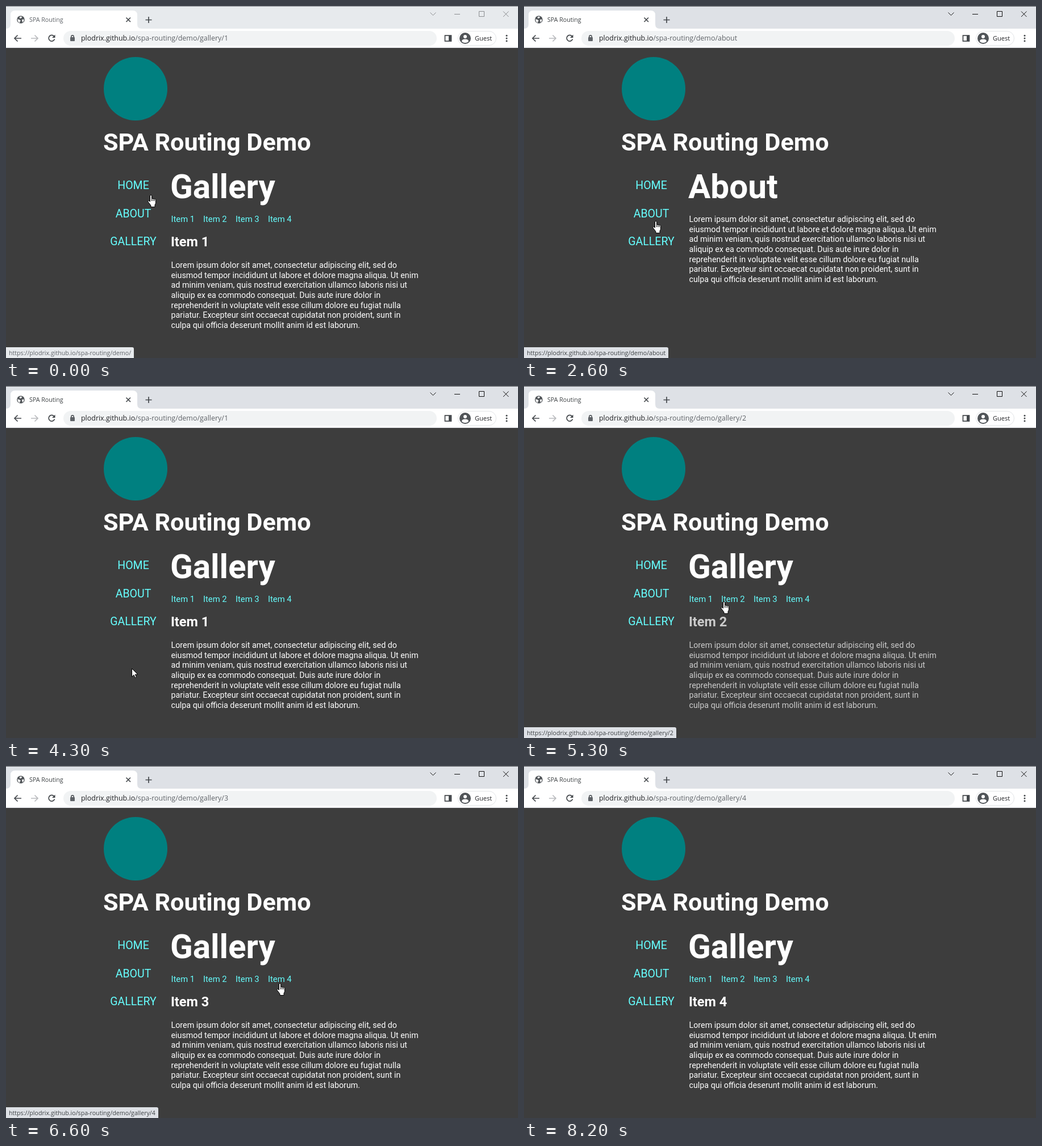
An HTML page for the animation above (8600 ms loop, 901 by 621 pixels).

```html
<!DOCTYPE html>
<html lang="en">
<head>
<meta charset="utf-8">
<title>SPA Routing</title>
<style>
  html, body { margin: 0; width: 100%; height: 100%; overflow: hidden; background: #3d3d3d; }
  svg { display: block; }
  #stage {
    --bar: #dee1e6; --edge: #55585c; --button: #111; --label: #3c4043;
    font-family: "Open Sans", sans-serif;
  }
  #stage.idle { --bar: #e7eaed; --edge: #85888c; --button: #8b8d90; --label: #5f6368; }
  .line { fill: none; stroke-width: 1.7; stroke: #45494d; }
  .button { fill: none; stroke: var(--button); }
  .small { font-size: 10.65px; fill: var(--label); }
  .url { font-size: 12.45px; fill: #5f6368; }
  .site { font-family: Roboto, sans-serif; fill: #fff; }
  .bold { font-weight: 700; }
  .brand { font-size: 43.2px; }
  .head { font-size: 58.4px; }
  .sub { font-size: 23.5px; }
  .nav { font-size: 19.5px; text-anchor: middle; fill: #6ff; }
  .links { font-size: 14.8px; fill: #6ff; }
  .lorem { font-size: 14.3px; }
  .pointer { fill: #fff; stroke: #000; stroke-linejoin: round; }
</style>
</head>
<body>
<svg id="stage" width="901" height="621" viewBox="0 0 901 621">
  <defs>
    <text id="lorem" class="lorem" y="444.4"></text>
  </defs>

  <rect width="901" height="621" fill="#3d3d3d"/>

  <!-- window frame -->
  <rect width="901" height="40" fill="var(--bar)"/>
  <rect width="901" height="1" fill="var(--edge)"/>
  <path d="M0 40q8 0 8-8V16q0-8 8-8h207q8 0 8 8v16q0 8 8 8z" fill="#fff"/>
  <rect y="40" width="901" height="33" fill="#fff"/>
  <rect y="73" width="901" height="1" fill="#dadce0"/>
  <circle cx="26" cy="24" r="6.8" fill="#505458"/>
  <path d="M20.5 23l4 1.5 1.5 2-2 1 .5 2.5q-4-1.5-4-7zM25 18.5l3 .5-.5 2-2.5 1-1.5-1.5zM28 24l3.5-.5q0 4-2.5 5.5l-.5-2.5z" fill="#fff"/>
  <text class="small" x="41" y="28">SPA Routing</text>
  <path class="line" d="M211.5 20.5l7.5 7.5m0-7.500l-7.5 7.5M245.500 24.500h11m-5.500-5.500v11"/>
  <path class="button" d="M746.5 11.5l5 5 5-5M789 14.5h10M832.5 9.5h9v9h-9zM875 9.5l9.500 9.500m0-9.500l-9.500 9.500"/>

  <!-- toolbar -->
  <path class="line" d="M27 57H15m5.500-5.500L15 57l5.500 5.500"/>
  <path class="line" d="M44 57h12m-5.500-5.500L56 57l-5.500 5.500" style="stroke:#b9bbbe"/>
  <path class="line" d="M84.5 53.3a5.300 5.300 0 1 0 1 5"/>
  <path d="M86.5 50.5v5.500H81z" fill="#45494d"/>
  <rect x="101" y="44" width="657" height="26" rx="13" fill="#f1f3f4"/>
  <rect x="113" y="55" width="8" height="7" rx="1" fill="#5f6368"/>
  <path class="line" d="M114.8 55.5v-1.500a2.200 2.200 0 0 1 4.400 0v1.500" style="stroke-width:1.4"/>
  <text class="url" x="132" y="61"><tspan fill="#202124">plodrix.github.io</tspan><tspan id="path"></tspan></text>
  <rect class="line" x="772.5" y="52" width="11" height="10"/>
  <rect x="779" y="52" width="5" height="10" fill="#45494d"/>
  <rect x="795.5" y="44.5" width="67" height="25" rx="12.5" fill="#fff" stroke="#e2e4e7"/>
  <circle cx="808" cy="57" r="10" fill="#505458"/>
  <circle cx="808" cy="54" r="3" fill="#fff"/>
  <path d="M802 62.5q0-4 6-4t6 4q-2.500 2.500-6 2.500t-6-2.500z" fill="#fff"/>
  <text x="825" y="61" font-size="11" fill="#202124">Guest</text>
  <g fill="#45494d">
    <circle cx="881" cy="52.3" r="1.5"/><circle cx="881" cy="57" r="1.5"/><circle cx="881" cy="61.7" r="1.5"/>
  </g>

  <!-- site -->
  <g class="site">
    <circle cx="228" cy="146" r="56" fill="#008080"/>
    <text class="bold brand" x="171" y="255">SPA Routing Demo</text>
    <g class="nav">
      <text x="224" y="323">HOME</text>
      <text x="224" y="373">ABOUT</text>
      <text x="224" y="422">GALLERY</text>
    </g>
    <g id="about">
      <text class="bold head" x="289" y="339">About</text>
      <use href="#lorem" y="-81"/>
    </g>
    <g id="gallery">
      <text class="bold head" x="289" y="339">Gallery</text>
      <g class="links">
        <text x="290.5" y="380.5">Item 1</text>
        <text x="347" y="380.5">Item 2</text>
        <text x="404" y="380.5">Item 3</text>
        <text x="461" y="380.5">Item 4</text>
      </g>
      <g id="item">
        <text id="title" class="bold sub" x="290" y="424"></text>
        <use href="#lorem"/>
      </g>
    </g>
  </g>

  <g id="status">
    <path id="bubble" fill="var(--bar)"/>
    <text id="link" class="small" x="5" y="615.5"></text>
  </g>

  <g id="hand" class="pointer">
    <path d="M4.5 12V2a1.500 1.500 0 0 1 3 0v5.500a1.300 1.300 0 0 1 2.500.4 1.200 1.200 0 0 1 2.300.6 1.100 1.100 0 0 1 2.200.8V15L13 18v3.500H6V19l-4.500-6C0 11 1.800 9.800 3 11z"/>
    <path d="M7.5 8v3M10 8.500v2.500M12.300 9v2" fill="none"/>
  </g>
  <path id="arrow" class="pointer" d="M.5.5v14.500l3.500-3.300 2.200 4.900 2.300-1-2.200-4.700H11z"/>
</svg>

<script>
const LOOP = 8600, STEP = 100, FADE = 300;
const $ = id => document.getElementById(id);

const lines = [
  'Lorem ipsum dolor sit amet, consectetur adipiscing elit, sed do',
  'eiusmod tempor incididunt ut labore et dolore magna aliqua. Ut enim',
  'ad minim veniam, quis nostrud exercitation ullamco laboris nisi ut',
  'aliquip ex ea commodo consequat. Duis aute irure dolor in',
  'reprehenderit in voluptate velit esse cillum dolore eu fugiat nulla',
  'pariatur. Excepteur sint occaecat cupidatat non proident, sunt in',
  'culpa qui officia deserunt mollit anim id est laborum.'
];
$('lorem').innerHTML = lines.map(s => `<tspan x="290.5" dy="17.65">${s}</tspan>`).join('');

// [time, page, item]
const visits = [
  [-FADE, 'gallery', 1], [2222, 'about', 0], [3422, 'gallery', 1],
  [5080, 'gallery', 2], [6080, 'gallery', 3], [6880, 'gallery', 4]
];

// [time, hovered link]
const hovers = [
  [0, ''], [1200, 'about'], [2800, 'gallery/1'], [4200, null],
  [5100, 'gallery/2'], [5500, 'gallery/3'], [6500, 'gallery/4'], [7400, null]
];

// [time, x, y, shape]
const moves = [
  [0, 249, 333, 'hand'], [900, 249, 333, 'hand'], [1400, 228, 367, 'hand'],
  [2500, 228, 367, 'hand'], [2900, 220, 413, 'hand'],
  [3800, 220, 413, 'hand'], [4000, 221, 447, 'arrow'], [4300, 221, 498, 'arrow'],
  [4400, 226, 493, 'arrow'], [4900, 346, 380, 'hand'],
  [5300, 346, 380, 'hand'], [5600, 406, 380, 'hand'],
  [5700, 406, 380, 'hand'], [5900, 411, 381, 'hand'],
  [6200, 411, 381, 'hand'], [6600, 476, 383, 'hand'],
  [7100, 476, 383, 'hand'], [7300, 469, 412, 'arrow'], [7500, 462, 442, 'arrow'],
  [7600, 462, 442, 'arrow'], [8100, 201, 606, 'arrow'], [8200, 201, 630, '']
];

const indexAt = (list, t) => list.findLastIndex(e => e[0] <= t);
const show = (id, on) => $(id).style.display = on ? '' : 'none';

function enter(id, p, shift) {
  $(id).setAttribute('opacity', p);
  $(id).setAttribute('transform', `translate(${-shift * (1 - p)})`);
}

function drawPage(t) {
  const i = indexAt(visits, t);
  const [start, page, item] = visits[i];
  const p = Math.min(1, (t - start) / FADE);
  const fresh = i > 0 && visits[i - 1][1] !== page;
  show('about', page === 'about');
  show('gallery', page === 'gallery');
  enter(page, fresh ? p : 1, 27);
  enter('item', p, fresh ? 21.6 : 0);
  $('title').textContent = 'Item ' + item;
  $('path').textContent = '/spa-routing/demo/' + page + (item ? '/' + item : '');
}

function drawStatus(t) {
  const target = hovers[indexAt(hovers, t)][1];
  show('status', target !== null);
  if (target === null) return;
  $('link').textContent = 'https://plodrix.github.io/spa-routing/demo/' + target;
  const w = Math.round($('link').getComputedTextLength()) + 10;
  $('bubble').setAttribute('d', `M0 602H${w - 3}q3 0 3 3V621H0z`);
}

function drawPointer(t) {
  const i = indexAt(moves, t);
  const [t0, x0, y0, shape] = moves[i];
  const [t1, x1, y1] = moves[i + 1] || [LOOP, x0, y0];
  const k = (t - t0) / (t1 - t0);
  const x = Math.round(x0 + (x1 - x0) * k), y = Math.round(y0 + (y1 - y0) * k);
  for (const id of ['hand', 'arrow']) {
    show(id, id === shape);
    $(id).setAttribute('transform', `translate(${x} ${y})`);
  }
}

let begin, last;
function tick(now) {
  begin ??= now;
  const t = Math.floor((now - begin) % LOOP / STEP) * STEP;
  if (t !== last) {
    last = t;
    $('stage').classList.toggle('idle', t < 2200);
    drawPage(t);
    drawStatus(t);
    drawPointer(t);
  }
  requestAnimationFrame(tick);
}
requestAnimationFrame(tick);
</script>
</body>
</html>
```
